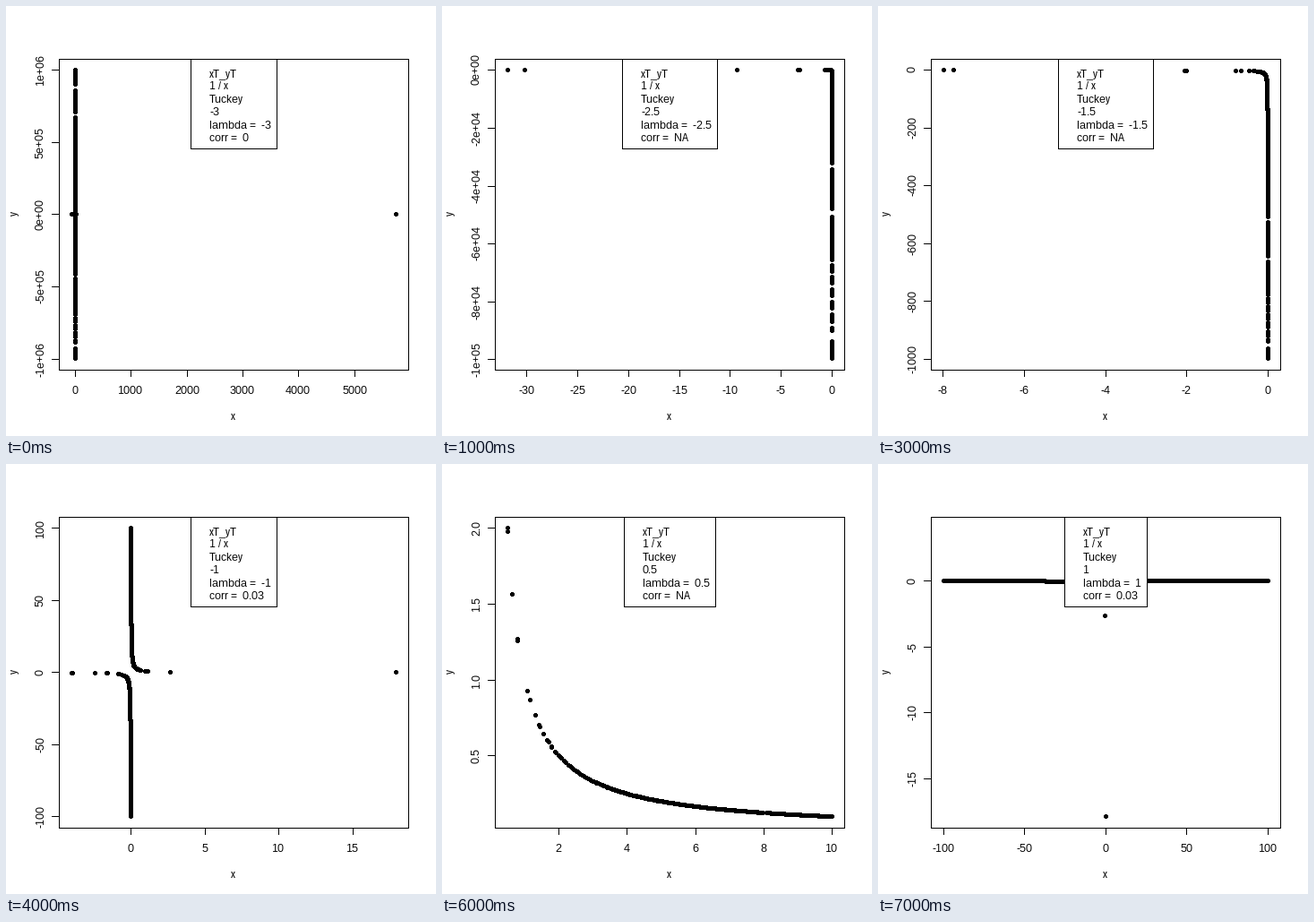
Animation of 480 by 480 pixels, one loop 8 s. Source, as a matplotlib script:

```python
import numpy as np
import matplotlib.pyplot as plt
from matplotlib.animation import FuncAnimation
from matplotlib.path import Path

plt.rcParams.update({
    "font.family": "Liberation Sans",
    "font.size": 9,
    "text.hinting": "native",
    "text.hinting_factor": 1,
})

SIZE = 480
LEFT, RIGHT, TOP, BOTTOM = 59.04, 449.76, 59.04, 406.56
PAD = 0.04
POWERS = [p for p in np.arange(-3, 1.5, 0.5) if p]


def dot_path():
    """A 5 x 5 pixel dot without its corners: one cross of two bars."""
    inner, outer = (-1, 2), (-2, 3)
    xs = [inner[0], inner[1], inner[1], outer[1], outer[1], inner[1],
          inner[1], inner[0], inner[0], outer[0], outer[0], inner[0]]
    ys = np.roll(xs, 3)
    # Pixel rows run downwards, so y is mirrored
    verts = np.column_stack([xs, -ys])
    return Path(np.vstack([verts, verts[:1]]), closed=True)


DOT = dot_path()
rng = np.random.default_rng(4)


def spread(near, start, end, gaps):
    """Jittered values, five per unit, with some stretches left empty."""
    far = np.linspace(start, end, int(5 * (end - start)))
    far[1:-1] += rng.uniform(-0.12, 0.12, far.size - 2)
    for center, width in gaps:
        far = far[abs(far - center) > width / 2]
        far = np.append(far, [center - width / 2, center + width / 2])
    return np.append(near, far)


wide = [(c, 1.6) for c in (64.35, 75.3, 96.7)]
narrow = [(c, 0.95) for c in range(85, 96, 2)]
positive = spread([0.25035, 0.2557, 0.41, 0.62, 0.63, 1.16, 1.32],
                  1.7, 99.87, wide + narrow)
negative = -spread([0.05585, 0.377, 0.89, 1.05],
                   1.54, 99.95, [(88.3, 1.6), (95.8, 1.6)])
DATA = np.concatenate([positive, negative])


def tukey(v, power):
    return np.sign(power) * v ** float(power)


def scale(values, start, end):
    """Map data to whole pixels inside a 4 % margin; also give the limits."""
    extra = PAD * np.ptp(values)
    lo, hi = values.min() - extra, values.max() + extra

    def to_pixel(v):
        return np.floor(start + (v - lo) / (hi - lo) * (end - start))
    return to_pixel, lo, hi


def pretty_step(lo, hi):
    """Round step of 1, 2, 5 or 10 times a power of ten."""
    cell = (hi - lo) / 5
    base = step = 10.0 ** np.floor(np.log10(cell))
    for k in (2, 5, 10):
        bias = 1.7 if k == 5 else 0.8
        if k * base - cell >= bias * (cell - step):
            break
        step = k * base
    return step


def ticks(lo, hi):
    step = pretty_step(lo, hi)
    style = ".0e" if step >= 1e4 else ".1f" if step < 1 else ".0f"
    for k in range(int(np.ceil(lo / step)), int(np.floor(hi / step)) + 1):
        yield k * step, f"{k * step:{style}}"


fig = plt.figure(figsize=(5, 5), dpi=96, facecolor="white")
ax = fig.add_axes([0, 0, 1, 1])


def line(xs, ys, z=1):
    ax.plot(np.add(xs, 0.5), np.add(ys, 0.5), color="black", lw=0.75,
            antialiased=False, snap=False, zorder=z,
            solid_capstyle="projecting")


def frame_box(x0, y0, x1, y1, z=1):
    line([x0, x1, x1, x0, x0], [y0, y0, y1, y1, y0], z)


def label(x, y, s, angle=0, ha="center", z=1):
    ax.text(x, y, s, rotation=angle, rotation_mode="anchor", ha=ha,
            va="baseline", color="black", zorder=z)


def draw_plot(x, y):
    to_x, *x_limits = scale(x, LEFT, RIGHT)
    to_y, *y_limits = scale(y, BOTTOM, TOP)
    for v, text in ticks(*x_limits):
        px = to_x(v)
        line([px, px], [406, 413])
        label(px, 433, text)
    for v, text in ticks(*y_limits):
        py = to_y(v)
        line([51, 59], [py, py])
        label(42, py, text, 90)
    label(253, 462, "x")
    label(13, 231.5, "y", 90)
    frame_box(59, 59, 449, 406)
    ax.plot(to_x(x), to_y(y), ls="none", marker=DOT, ms=4.5, mew=0,
            color="black", antialiased=False, zorder=2)


def draw_legend(power, corr):
    # The box grows with a minus sign and with a decimal
    width = 92 + 4 * (power < 0) + 10 * (power % 1 != 0)
    x0 = 254 - width // 2
    x1 = x0 + width
    ax.fill([x0, x1, x1, x0], [59, 59, 159, 159], color="white", lw=0,
            zorder=3)
    frame_box(x0, 59, x1, 159, 4)
    rows = ["xT_yT", "1 / x", "Tuckey", f"{power:g}",
            f"lambda =  {power:g}", f"corr =  {corr}"]
    for k, row in enumerate(rows, 1):
        label(x0 + 21, round(64.6 + 14.4 * k), row, ha="left", z=5)


def draw(i):
    power = POWERS[i]
    ax.cla()
    ax.set_xlim(0, SIZE)
    ax.set_ylim(SIZE, 0)
    ax.set_autoscale_on(False)
    ax.axis("off")
    whole = power % 1 == 0
    # Fractional powers exist only for positive values
    base = DATA if whole else positive
    x, y = tukey(base, power), tukey(1 / base, power)
    corr = "NA"
    if whole:
        corr = f"{round(np.corrcoef(x, y)[0, 1], 2) + 0.0:g}"
    draw_plot(x, y)
    draw_legend(power, corr)
    return []


anim = FuncAnimation(fig, draw, frames=len(POWERS), interval=1000, repeat=True)
plt.show()
```
